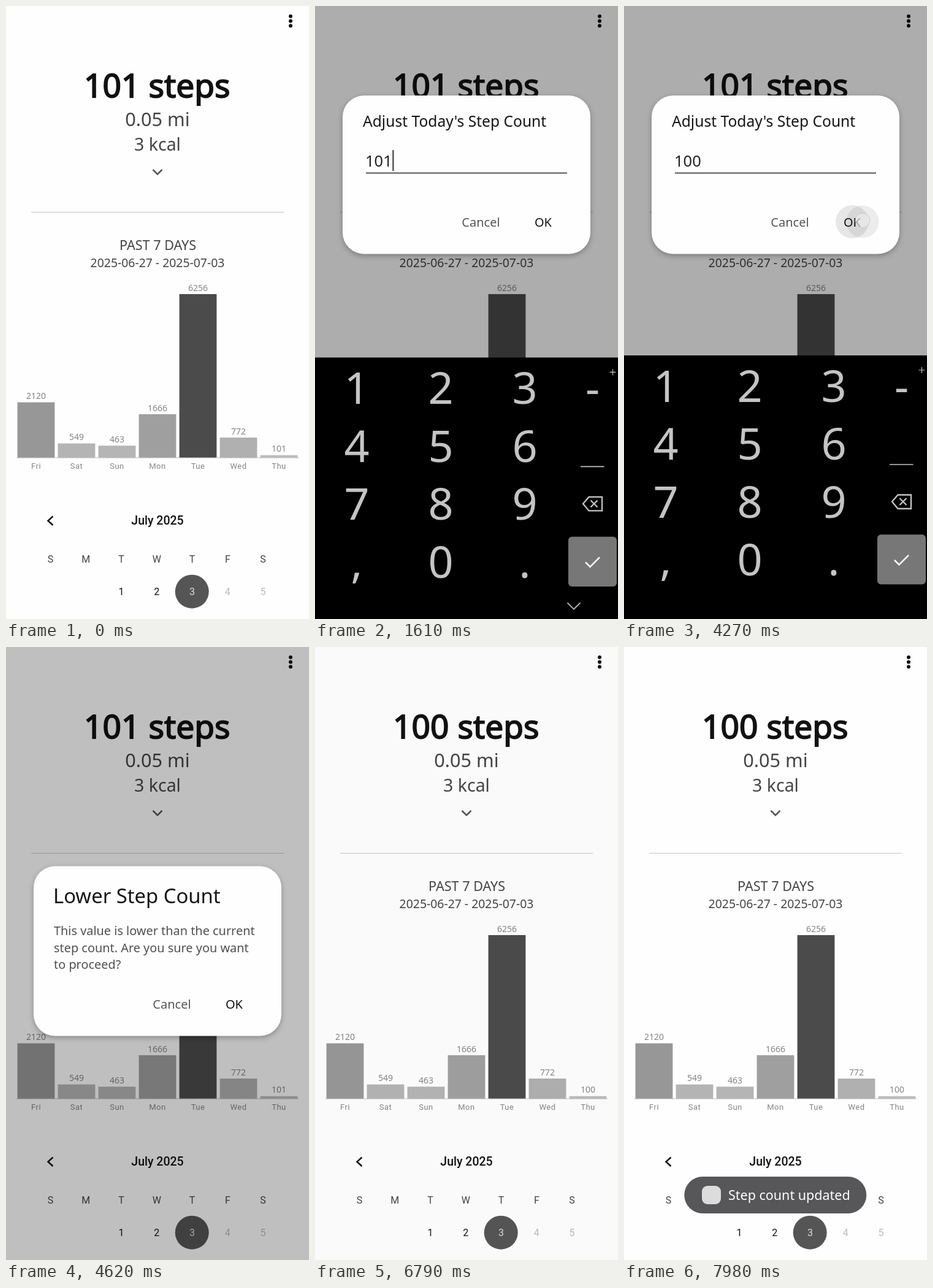
Animation, 494 px wide and 1000 px high, one loop 8 s. Source, as an HTML page:

```html
<!DOCTYPE html>
<html lang="en">
<head>
<meta charset="utf-8">
<title>Step counter</title>
<style>
  html, body { margin: 0; height: 100%; overflow: hidden; background: #fefefe; }
  svg { display: block; width: 100%; height: 100%; font-family: "Noto Sans", "Open Sans", sans-serif; }
  .roboto { font-family: Roboto, sans-serif; }
  .mid { text-anchor: middle; }
  .card { filter: drop-shadow(0 3px 4px rgba(0, 0, 0, .28)); }
  #total { stroke: #111; stroke-width: 1.8; }
</style>
</head>
<body>
<svg id="stage" viewBox="0 0 494 1000"></svg>
<script>
const LOOP = 8000, TICK = 70;
const OK_X = 372, OK_Y = 352;
const DIALOG2_SHIFT = 230.5;

const text = (x, y, size, fill, str, attrs = 'class="mid"') =>
  `<text x="${x}" y="${y}" font-size="${size}" fill="${fill}" ${attrs}>${str}</text>`;
const rect = (x, y, w, h, fill, r = 0, attrs = '') =>
  `<rect x="${x}" y="${y}" width="${w}" height="${h}" rx="${r}" fill="${fill}" ${attrs}/>`;
const path = (d, stroke, width = 2.5) =>
  `<path d="${d}" fill="none" stroke="${stroke}" stroke-width="${width}"/>`;
const group = (id, body) => `<g id="${id}">${body}</g>`;

function chart() {
  const days = { Fri: 2120, Sat: 549, Sun: 463, Mon: 1666, Tue: 6256, Wed: 772, Thu: 101 };
  const bars = Object.entries(days).map(([day, steps], i) => {
    const cx = 49 + 66 * i, h = steps * .04268, top = 737 - h;
    const g = Math.round(188 - (steps - 101) * .0183);
    const id = day === 'Thu' ? ' id="barLabel"' : '';
    return rect(cx - 30.4, top, 60.8, h, `rgb(${g},${g},${g})`) +
      text(cx, top - 5.3, 14, '#858585', steps, 'class="mid"' + id) +
      text(cx, 755, 13, '#858585', day, 'class="mid roboto" letter-spacing=".5"');
  });
  return bars.join('') + path('M17 737H477', '#bbb', 1);
}

function calendar() {
  const x = i => 72.6 + 57.75 * i;
  const roboto = 'class="mid roboto"';
  const names = [...'SMTWTFS'].map((d, i) => text(x(i), 908.3, 16, '#444', d, roboto));
  const dates = [1, 2, 3, 4, 5].map(d =>
    text(x(d + 1), 960.7, 16, d < 3 ? '#111' : d === 3 ? '#ddd' : '#bbb', d, roboto));
  return path('M76.5 832.5L68.5 839.7L76.5 847', '#111') +
    text(247, 846, 19.5, '#111', 'July 2025', roboto + ' font-weight="500"') +
    names.join('') + '<circle cx="303.2" cy="955.2" r="27.5" fill="#555"/>' + dates.join('');
}

function page() {
  const dots = [16.8, 24.5, 32.2].map(y => `<circle cx="464" cy="${y}" r="3" fill="#111"/>`);
  return dots.join('') +
    text(246.3, 148.5, 53.3, '#111', '101 steps', 'class="mid" id="total"') +
    text(247, 196, 30.7, '#444', '0.05 mi') +
    text(247, 235.5, 28.5, '#444', '3 kcal') +
    path('M239.5 267L247 274.5L254.5 267', '#555') +
    path('M41 336.5H453', '#c4c4c4', 1) +
    text(247.5, 398, 21.6, '#444', 'PAST 7 DAYS') +
    text(247, 426, 19.4, '#444', '2025-06-27 - 2025-07-03') +
    chart() + calendar();
}

const card = (y, h) => rect(45, y, 404, h, '#fefefe', 35, 'class="card"');
const buttons = y => text(270.5, y, 20, '#555', 'Cancel') + text(OK_X, y, 20, '#111', 'OK');

function adjustDialog() {
  return card(146, 258.5) +
    text(78, 196.7, 24.6, '#161616', "Adjust Today's Step Count", '') +
    text(82, 262, 25.5, '#222', '101', 'id="input"') +
    rect(126, 235, 2.5, 34, '#555', 0, 'id="cursor"') +
    path('M83 272.5H411', '#555', 2) + buttons(360);
}

function confirmDialog() {
  const lines = ['This value is lower than the current',
    'step count. Are you sure you want', 'to proceed?'];
  return card(357.5, 277) +
    text(77, 417.7, 32.8, '#161616', 'Lower Step Count', '') +
    lines.map((s, i) => text(78, 470 + 27.7 * i, 19.9, '#505050', s, '')).join('') +
    buttons(590);
}

function keyboard() {
  const ink = '#c4c4c4';
  const keys = ['123', '456', '789', ',0.'].map((row, r) =>
    [...row].map((k, c) => text(68 + 137 * c, 646 + 94.4 * r, 72, ink, k)).join(''));
  return rect(0, 570, 494, 460, '#000') + keys.join('') +
    text(452.5, 646, 72, ink, '-') +
    path('M433 748H471.5', ink, 1.7) +
    path('M480.5 594H490.5M485.5 589V599', ink, 1.2) +
    path('M437 808.5L446.5 797.5H468V820H446.5ZM449.5 803L460.5 814M460.5 803L449.5 814', ink, 2.3) +
    rect(413, 862.3, 79, 81.3, '#777', 6) +
    path('M441 904L448.5 911.5L464 896', '#fff');
}

function toast() {
  return rect(98.3, 864, 297, 60, '#515153', 30, 'opacity=".96"') +
    rect(127, 879, 31, 30, '#dcdcdc', 9) +
    text(170, 902, 21.5, '#fff', 'Step count updated', '');
}

const stage = document.getElementById('stage');
stage.innerHTML = rect(0, 0, 494, 1000, '#fefefe') + group('page', page()) +
  rect(0, 0, 494, 1000, '#000', 0, 'id="dim"') +
  group('adjust', adjustDialog()) + group('confirm', confirmDialog()) +
  group('ripple', `<circle cx="${OK_X}" cy="${OK_Y}" r="27" fill="#000" opacity=".09"/>
    <circle cx="${OK_X + 17}" cy="${OK_Y}" r="26.5" fill="#000" opacity=".07"/>`) +
  group('keyboard', keyboard()) +
  group('navArrow', path('M411.5 973.5L422 984L432.5 973.5', '#aaa', 2)) +
  group('toast', toast()) +
  '<circle id="touch" r="12" fill="#eee" fill-opacity=".65" stroke="#bbb" stroke-opacity=".7"/>';

const el = id => document.getElementById(id);
const ramp = (t, start, len) => Math.min(1, Math.max(0, (t - start) / len));
const easeOut = (u, power) => 1 - (1 - u) ** power;
const show = (id, alpha) => {
  el(id).setAttribute('opacity', alpha);
  el(id).setAttribute('visibility', alpha > 0 ? 'visible' : 'hidden');
};
const between = (t, a, b) => t >= a && t < b;

// time pressed, time released, x, y
const touches = [
  [1960, 2060, 452, 808],
  [2500, 2600, 205, 905],
  [4200, 4300, 389, 350],
  [6440, 6530, 389, 350 + DIALOG2_SHIFT]
];
const ERASE = 2030, TYPE = 2570, CONFIRMED = 6580;

function draw(now) {
  const t = Math.floor(now % LOOP / TICK) * TICK;

  const steps = t < CONFIRMED ? 101 : 100;
  el('total').textContent = steps + ' steps';
  el('barLabel').textContent = steps;

  const dim1 = easeOut(ramp(t, 1170, 220), 2) - ramp(t, 4340, 210);
  const dim2 = easeOut(ramp(t, 4505, 220), 2) - ramp(t, CONFIRMED, 220);
  show('dim', .32 * (1 - (1 - dim1) * (1 - dim2)));
  show('adjust', ramp(t, 1170, 150) - ramp(t, 4340, 150));
  show('confirm', ramp(t, 4490, 120) - ramp(t, CONFIRMED, 150));

  const value = t < ERASE ? '101' : t < TYPE ? '10' : '100';
  el('input').textContent = value;
  el('cursor').setAttribute('x', 82.5 + 14.55 * value.length);
  const lastEdit = t < ERASE ? 1400 : t < TYPE ? ERASE : TYPE;
  const blinkOn = t >= lastEdit && Math.floor((t - lastEdit) / 500) % 2 === 0;
  el('cursor').setAttribute('opacity', blinkOn && t < 4340 ? 1 : 0);

  const rise = easeOut(ramp(t, 1330, 350), 3) - ramp(t, 4300, 250) ** 2;
  show('keyboard', rise > 0 ? 1 : 0);
  el('keyboard').setAttribute('transform', `translate(0 ${430 * (1 - rise)})`);
  show('navArrow', between(t, 1540, 4250) ? 1 : 0);

  const second = t > 5000;
  show('ripple', second ? ramp(t, 6370, 70) - ramp(t, 6550, 100)
                        : ramp(t, 4200, 70) - ramp(t, 4300, 100));
  el('ripple').setAttribute('transform', `translate(0 ${second ? DIALOG2_SHIFT : 0})`);

  const touch = touches.find(([a, b]) => between(t, a, b));
  show('touch', touch ? 1 : 0);
  if (touch) {
    el('touch').setAttribute('cx', touch[2]);
    el('touch').setAttribute('cy', touch[3]);
  }

  show('toast', easeOut(ramp(t, 6860, 300), 2));
}

const start = performance.now();
(function frame() {
  draw(performance.now() - start);
  requestAnimationFrame(frame);
})();
</script>
</body>
</html>
```
